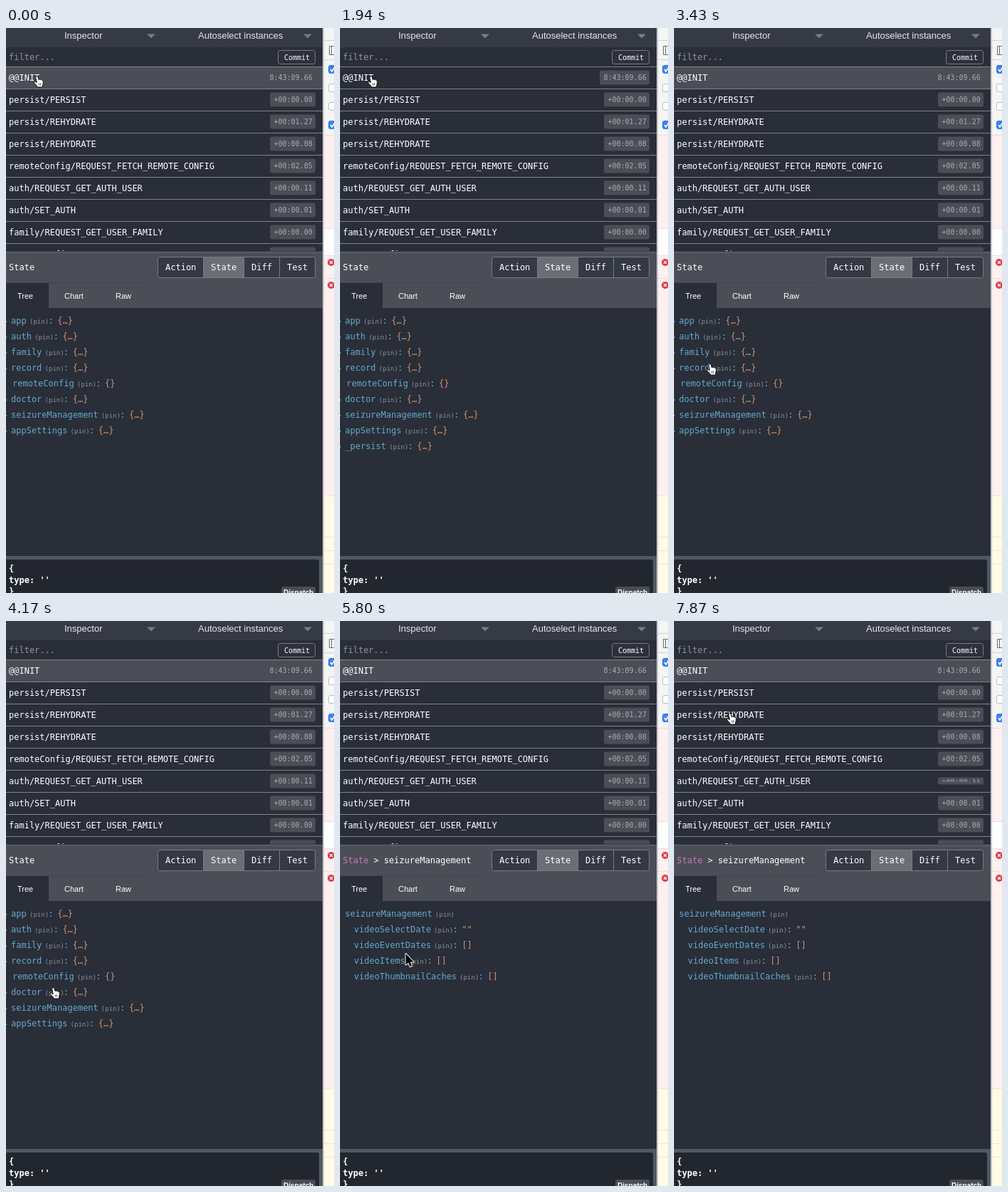
An HTML page with a canvas for the animation above (8 s loop, 461x793 px).

```html
<!DOCTYPE html>
<html lang="en">
<head>
<meta charset="utf-8">
<title>State inspector</title>
<style>
html, body { margin: 0; width: 100%; height: 100%; overflow: hidden; background: #2a2e39; }
canvas { display: block; }
</style>
</head>
<body>
<canvas id="stage" width="461" height="793"></canvas>
<script>
const ctx = document.getElementById('stage').getContext('2d');
const LOOP = 8000;
const CHAR = 7.2;
const mono = (size = 12, weight = '') => `${weight} ${size}px "DejaVu Sans Mono", monospace`;
const sans = (size, weight = '') => `${weight} ${size}px "Liberation Sans", Arial, sans-serif`;

const BG = '#2a2e39', BAR = '#4b4e56', KEY = '#65aaca', VALUE = '#cf916d';

const actions = [
  ['@@INIT', '8:43:09.66'],
  ['persist/PERSIST', '+00:00.00'],
  ['persist/REHYDRATE', '+00:01.27'],
  ['persist/REHYDRATE', '+00:00.08'],
  ['remoteConfig/REQUEST_FETCH_REMOTE_CONFIG', '+00:02.05'],
  ['auth/REQUEST_GET_AUTH_USER', '+00:00.11'],
  ['auth/SET_AUTH', '+00:00.01'],
  ['family/REQUEST_GET_USER_FAMILY', '+00:00.00'],
  ['remoteConfig/SET_REMOTE_CONFIG', '+00:00.00'],
];
const stateKeys = ['app', 'auth', 'family', 'record', 'remoteConfig', 'doctor', 'seizureManagement', 'appSettings'];
const pinnedKeys = [['videoSelectDate', '""'], ['videoEventDates', '[]'], ['videoItems', '[]'], ['videoThumbnailCaches', '[]']];

const hand = new Path2D('M3 1.4Q4.6 -.4 5.9 1.4L7 5.4Q8.4 4.3 9.3 5.6Q10.8 4.9 11.6 6.3Q13.1 6 13.3 7.6L13 11.6L12 16H5.6Q4 13 1 10.6Q-.2 8.6 1.4 8.2Q3 8.3 4.2 9.8L2.8 3Z');
const arrow = new Path2D('M0 0V15.6L3.6 12.4L6 18L8.5 17L6.2 11.6H11Z');

// Pointer positions: start time, x, y, shape
const pointer = [
  [0, 39, 67, hand], [450, 39, 66.5, hand], [1050, 39, 67, hand],
  [2540, 104, 400, arrow], [2690, 86, 611, arrow], [2980, 70, 585, arrow],
  [3130, 46, 540, hand], [3280, 37, 496, hand], [3430, 46, 471, hand],
  [3580, 47, 474, hand], [3730, 49, 483, hand], [3880, 52, 496, hand], [4020, 54, 508, hand],
  [4170, 62, 514, hand], [4320, 80, 522, hand], [4460, 104, 531, hand],
  [4610, 122, 538, hand], [4760, 128, 541, hand],
  [5500, 112, 505, arrow], [5650, 98, 478, arrow], [5800, 92.5, 467, arrow],
  [5950, 90, 467, arrow], [6100, 89, 470, arrow], [6240, 94, 477, arrow],
  [6390, 102, 486, arrow], [6540, 108, 493, arrow], [6690, 111, 495, arrow],
  [6980, 90, 430, arrow], [7130, 58, 300, hand], [7280, 43, 238, hand],
  [7580, 52, 213, hand], [7730, 66, 164, hand], [7870, 74, 129, hand],
];

function rect(x, y, w, h, color) {
  ctx.fillStyle = color;
  ctx.fillRect(x, y, w, h);
}

function box(x, y, w, h, radius, fill, stroke) {
  ctx.beginPath();
  ctx.roundRect(x, y, w, h, radius);
  if (fill) { ctx.fillStyle = fill; ctx.fill(); }
  if (stroke) { ctx.strokeStyle = stroke; ctx.lineWidth = 1; ctx.stroke(); }
}

function text(string, x, y, color = '#fff', font = mono()) {
  ctx.font = font;
  ctx.fillStyle = color;
  ctx.fillText(string, x, y);
}

function line(color, width, ...points) {
  ctx.beginPath();
  points.forEach(([x, y]) => ctx.lineTo(x, y));
  ctx.strokeStyle = color;
  ctx.lineWidth = width;
  ctx.stroke();
}

function drawHeader() {
  rect(0, 0, 445, 27, '#353a45');
  text('Inspector', 82, 15, '#e6e7e9', sans(13));
  text('Autoselect instances', 270, 15, '#e6e7e9', sans(13));
  for (const x of [198, 418]) {
    ctx.beginPath();
    ctx.moveTo(x, 8.5);
    ctx.lineTo(x + 12, 8.5);
    ctx.lineTo(x + 6, 14.5);
    ctx.fillStyle = '#777b82';
    ctx.fill();
  }
  text('filter...', 4, 45, '#91949a');
  box(382.5, 31.5, 52, 19, 3, '#2c313c', '#777b83');
  text('Commit', 391, 45, '#fff', mono(10));
}

function drawBadge(time, y, scale) {
  const width = time.length * 6 + 10;
  ctx.save();
  ctx.translate(0, y);
  ctx.scale(1, scale);
  box(435 - width, -10, width, 20, 3, '#4b4e56');
  text(time, 435 - width + 5.5, 3.5, '#a9abaf', mono(10));
  ctx.restore();
}

function drawActions(t) {
  const selected = t < 1940 || t >= 2090;
  ctx.save();
  ctx.beginPath();
  ctx.rect(0, 54, 445, 259);
  ctx.clip();
  actions.forEach(([name, time], i) => {
    const y = 54 + i * 31;
    if (i === 0 && selected) rect(0, y, 445, 31, BAR);
    rect(0, y, 445, 1, '#7e8187');
    text(name, 4, y + 20);
    const flipping = i === 5 && t >= 7730;
    drawBadge(time, y + 15.5, flipping ? 0.5 : 1);
  });
  ctx.restore();
}

function drawStateBar(pinned) {
  rect(0, 313, 445, 3, '#555c66');
  rect(0, 313, 445, 1, '#363b46');
  rect(0, 316, 445, 77, BAR);
  rect(0, 357, 197, 1, '#42454e');
  text('State', 4, 340, pinned ? '#c577b6' : '#fff');
  if (pinned) text('> seizureManagement', 4 + 6 * CHAR, 340);

  box(213.5, 321.5, 221, 29, 3, '#343944', '#777b83');
  rect(278, 322, 56, 28, '#6b6e75');
  for (const x of [277, 334, 384]) rect(x, 322, 1, 28, '#777b83');
  [['Action', 224], ['State', 288], ['Diff', 345], ['Test', 395]]
    .forEach(([label, x]) => text(label, x, 340));

  rect(0, 358, 60, 35, BG);
  [['Tree', 16], ['Chart', 82], ['Raw', 154]]
    .forEach(([label, x]) => text(label, x, 380, '#fff', sans(11)));
}

function treeRow(key, value, x, row, underline) {
  const y = 415 + row * 22;
  const pinX = x + key.length * CHAR + 4.4;
  text(key, x, y, KEY);
  text('(pin)', pinX, y, '#8c8f96', mono(9));
  if (underline) rect(pinX, y + 1, 27, 1, '#8c8f96');
  if (!value) return;
  text(':', pinX + 26.5, y, KEY);
  text(value, pinX + 39.2, y, value === '""' ? '#a3ad55' : VALUE);
}

function drawTree(t, pinned) {
  if (pinned) {
    treeRow('seizureManagement', '', 7, 0);
    pinnedKeys.forEach(([key, value], i) => treeRow(key, value, 19.6, i + 1));
    return;
  }
  const keys = t >= 1940 && t < 2090 ? [...stateKeys, '_persist'] : stateKeys;
  keys.forEach((key, i) => {
    const empty = key === 'remoteConfig';
    treeRow(key, empty ? '{}' : '{…}', empty ? 9 : 7, i, key === 'seizureManagement' && t >= 4760);
    if (!empty) rect(0, 411 + i * 22, 1, 2, KEY);
  });
}

function drawDispatcher() {
  rect(0, 741, 445, 52, '#505861');
  box(-4, 746, 444, 60, 3, '#22262f');
  ['{', "type: ''", '}'].forEach((s, i) => text(s, 4, 763 + i * 16, '#fff', mono(12, 'bold')));
  box(387, 784, 48, 20, 3, '#4b4e56');
  text('Dispatch', 390, 796, '#fff', sans(10, 'bold'));
}

function drawSidePanel() {
  rect(445, 0, 16, 793, '#fff');
  rect(447, 0, 14, 150, '#f5f5f5');
  rect(447, 17, 14, 1, '#c9d4e6');
  rect(447, 44, 14, 1, '#d4d4d4');
  box(454.5, 25.5, 14, 12, 0, null, '#6e6e6e');
  rect(457, 26, 1, 12, '#6e6e6e');
  [58, 84, 110, 136].forEach((y, i) => {
    const checked = i % 3 === 0;
    box(453.5, y - 5.5, 11, 11, 2.5, checked ? '#3b82f0' : '#fff', checked ? '#3478e6' : '#bcbcbc');
    if (checked) line('#fff', 1.6, [456, y], [458, y + 3], [462, y - 3]);
  });
  rect(447, 150, 14, 131, '#fff0f0');
  rect(447, 320, 14, 336, '#fff0f0');
  for (const y of [150, 281, 319, 351]) rect(447, y, 14, 1, '#f6d8d8');
  rect(447, 656, 14, 137, '#fffbe5');
  for (const y of [656, 714, 733, 752]) rect(447, y, 14, 1, '#f3e9bd');
  for (const y of [329, 361]) {
    box(452, y - 5, 10, 10, 5, '#e0383e');
    line('#fff', 1.3, [455, y - 2], [459, y + 2]);
    line('#fff', 1.3, [459, y - 2], [455, y + 2]);
  }
  rect(445, 0, 2, 793, '#c4c5c8');
}

function drawPointer(t) {
  const [, x, y, shape] = pointer.findLast(([start]) => start <= t);
  const isHand = shape === hand;
  ctx.save();
  ctx.translate(x, y);
  ctx.lineJoin = 'round';
  ctx.lineWidth = isHand ? 1 : 2;
  ctx.strokeStyle = isHand ? '#111' : '#fff';
  ctx.fillStyle = isHand ? '#fff' : '#000';
  if (isHand) {
    ctx.fill(shape);
    ctx.stroke(shape);
    for (const dx of [7.3, 9.5]) line('#111', 0.8, [dx, 10.5], [dx + 0.1, 13.5]);
  } else {
    ctx.stroke(shape);
    ctx.fill(shape);
  }
  ctx.restore();
}

function draw(now) {
  const t = now % LOOP;
  const pinned = t >= 5210;
  rect(0, 0, 445, 793, BG);
  drawHeader();
  drawActions(t);
  drawStateBar(pinned);
  drawTree(t, pinned);
  drawDispatcher();
  drawSidePanel();
  drawPointer(t);
}

const start = performance.now();
function tick() {
  draw(performance.now() - start);
  requestAnimationFrame(tick);
}
tick();
</script>
</body>
</html>
```
